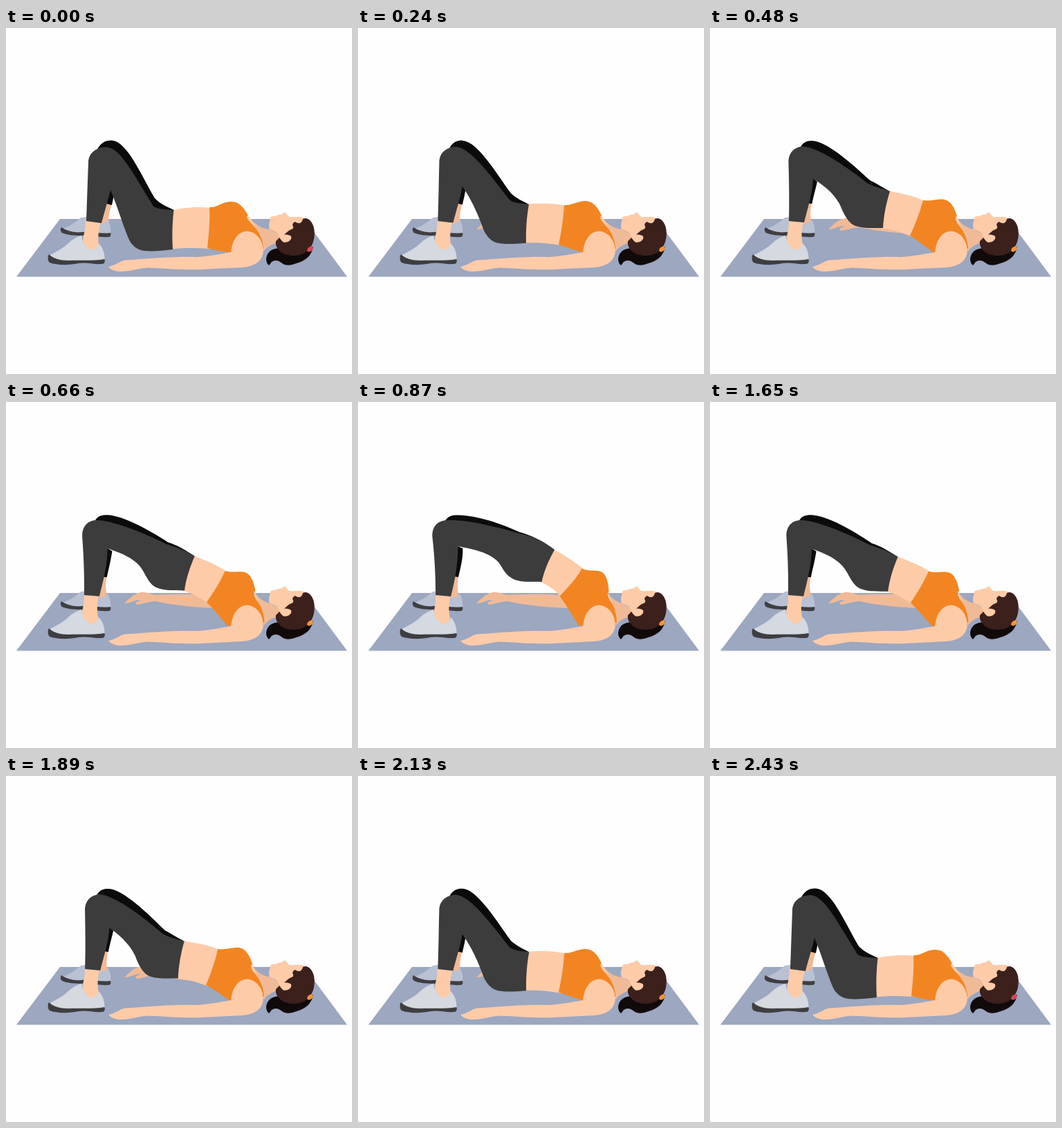
Animation, 500 px wide and 500 px high, one loop 2730 ms. Source, as an HTML page:

```html
<!DOCTYPE html>
<html lang="en">
<head>
<meta charset="utf-8">
<title>Glute bridge</title>
<style>
  html, body { margin: 0; width: 100%; height: 100%; overflow: hidden; background: #fefefe; }
  svg { display: block; width: 100%; height: 100%; }
  .mat { fill: #9ca7c0; }
  .skin { fill: #fecba8; }
  .shade { fill: #f0ba96; }
  .pants { fill: #3c3c3c; }
  .far { fill: #0b0b0b; }
  .top { fill: #f28521; }
  .shoe { fill: #d5d9e0; }
  .far-shoe { fill: #b9c1d3; }
  .sole { fill: #3e3e40; }
  .hair { fill: #3b201c; }
  .tail { fill: #110a0a; }
</style>
</head>
<body>
<svg viewBox="0 0 500 500">
  <path class="mat" d="M78 276H431L493 359.500H15Z"/>
  <path class="shade" d="M171 291C176 286 184 277 195 275C202 274 208 278 217 278.500C245 278 270 277 292 279L304 298C280 297 240 294 216 288C207 288 198 292 189 293L187 290L195 286C188 285 180 291 171 291Z"/>

  <path class="shade" id="farAnkle"/>
  <path class="far-shoe" d="M81 290C91 287 101 281 108 274L116 273L128 281C135 285 143 283 147 277C150 282 152 289 151 297L110 298Z"/>
  <path class="sole" d="M80 288C88 293 97 296 108 295C124 294 138 298 151 296C152 299 151 302 149 302C135 303 123 299 109 300C98 300 88 299 81 296C79 294 78 291 80 288Z"/>
  <path class="far" id="farCalf"/>
  <path class="far" id="farThigh"/>

  <path class="skin" id="ankle"/>
  <path class="shoe" d="M62 329C73 323 83 318 90 311C96 305 103 302 109 300C110 308 115 317 121 320C127 321 133 317 134 311C140 317 143 326 142.500 336L105 339L64 334Z"/>
  <path class="sole" d="M62 327C68 333 78 336 90 336C106 335 125 337 142.500 334C143.500 338 142 341 139 341C126 342 117 338 105 340C90 343 74 343 63 339C60 336 60 330 62 327Z"/>
  <path class="skin" id="waist"/>
  <path class="pants" id="leg"/>

  <path class="tail" d="M444 316C441 330 433 336 420 340C412 343 404 344 399 340C393 335 388 335 384 338C382 340 381 342 380 343C374 338 375 328 382 322C387 318 398 317 406 320Z"/>
  <path class="shade" id="neck"/>
  <path class="skin" d="M381 291C379 286 380 281 382 276C381 273 385 271 390 272L392 270L397 270L403 266C405 268 406 271 410 273C417 274 424 271 431 275L430 290L408 303L398 303C394 297 389 293 381 291Z"/>
  <path class="hair" d="M429 276C436 272 443 280 445 289C448 305 442 319 432 325C422 331 406 330 398 324C392 320 389 314 390 308L395 303L404 297C406 295 408 293 410 292C414 291 416 289 415 287C413 284 415 281 418 280C423 284 428 282 429 276Z"/>
  <path class="skin" d="M393 298C400 298 409 298 412 301C414 306 407 311 401 309.500C398 308 395 303 393 298Z"/>
  <ellipse id="clip" cx="439.500" cy="319.500" rx="5" ry="3.200" transform="rotate(-38 439.500 319.500)"/>

  <path class="top" id="bra"/>
  <path class="skin" id="collar"/>
  <path class="skin" d="M325.500 324C326 308 335 293.500 349 293.500C363 295 373 309 371.500 325C369 340 355 345 340 346L280 349C250 350 225 347 205 346.500C192 347 180 352 163 352C157 351 151 349 148 345C153 344 160 341 165 338C170 335 176 335 182 335C210 333 245 330 275 331C295 330 312 326 325.500 324Z"/>
</svg>
<script>
const LOOP = 2730, STEP = 30, MID = 0.476;

// Each part: lying, half raised and fully raised outline.
const parts = {
  leg: [
    "M116 279C117 250 118 220 119 195C119 181 129 173 145 172C166 173 186 215 211 254C213 262 228 262 242.5 263C240 283 240 303 241 320C225 322 210 323 200 322C190 321 181 314 177 304C168 282 160 255 151 234C148 247 143 263 138 282Z",
    "M114 279C115 250 114 215 113.5 195C113 181 121 172 134 171C154 172 195 198 227 224C238 230 249 232 260 236C254 255 251 272 250 289C235 289 222 290 210 286C202 283 196 274 191 263C185 245 168 229 149 218C148 240 141 260 136 281Z",
    "M112 279C112 250 110 220 107 195C106 181 114 171 128 171C153 169 193 177 232 187C250 190 268 198 286 212C277 228 270 243 267 258C255 257 240 260 226 254C213 248 211 239 204 230C191 216 167 212 144 208C144 235 140 258 134 281Z"
  ],
  farThigh: [
    "M132 175C138 164 146 162 153 162.5C175 164 195 212 215 246C222 254 234 259 243 263L222 285Z",
    "M130 174C134 164 141 163 148 163C169 164 205 196 231 220C240 224 250 231 260 236L225 252Z",
    "M125 172C131 163 138 163.5 146 163.5C172 164 207 174 233 185.5C250 190 268 198 286 212L225 220Z"
  ],
  farCalf: [
    "M149 230L155 238C156 245 154 250 153 256L142 253Z",
    "M146 215L155 222C152 235 149 245 147.5 254L140 253Z",
    "M141 207L151 211C152 226 148 240 145 253L137 252Z"
  ],
  farAnkle: [
    "M142 252L152.500 255C150 265 147 272 149 281L134 284Z",
    "M139 252L147 253C145 264 144 270 147 281L134 284Z",
    "M136 251L145 252C144 264 143 270 146 281L132 284Z"
  ],
  ankle: [
    "M115 277L137 280C135 290 132 300 134 313C132 320 125 323 119 320C113 316 110 309 112 301C114 293 115 285 115 277Z",
    "M114 277L135 279C133 290 131 300 134 313C132 320 125 323 119 320C113 316 109 309 111 301C113 293 114 285 114 277Z",
    "M112 277L133 279C132 290 130 300 133 313C132 320 125 323 119 320C112 316 109 309 110 301C112 293 112 285 112 277Z"
  ],
  waist: [
    "M241 263C260 259 280 258 297 260L296 319C275 318 255 317 237 320Z",
    "M257 235C275 239 294 242 310 250L292 302C275 294 262 291 247 289Z",
    "M284 211C300 220 314 229 327 241L295 282C286 270 278 264 265 258Z"
  ],
  neck: [
    "M347 271C355 274 359 289 382 291L398 300L392 310C385 312 376 317 372 323L360 310Z",
    "M354 271C358 275 363 287 382 291L398 300L392 310C385 312 376 317 373 323L362 310Z",
    "M361 275C365 281 370 288 382 291L398 300L392 310C385 312 376 317 373 323L365 310Z"
  ],
  bra: [
    "M294 259C306 260 311 251 326 251C338 251 345 262 350 271C345 274 352 279 357 285C366 295 371 304 372 319L325 324C315 324 303 321 291 318C293 298 295 279 294 259Z",
    "M308 249C318 251 330 246 339 248C349 250 354 262 357 272C353 275 355 280 360 286C368 295 372 305 373 319L322 324C312 316 300 307 289 300C297 283 303 267 308 249Z",
    "M325 240C336 246 346 241 354 246C361 251 362 264 363 273C361 278 361 282 365 288C371 296 374 306 374 319L319 323C312 312 303 295 292 279C304 267 316 255 325 240Z"
  ],
  collar: [
    "M348 271C353 274 357 281 362 288C355 284 350 279 348 271Z",
    "M355 272C358 275 360 281 364 288C358 284 355 279 355 272Z",
    "M361 276C363 279 365 284 368 290C363 286 361 281 361 276Z"
  ]
};

const byId = id => document.getElementById(id);
const numbers = path => path.match(/[\d.]+/g).map(Number);
const shapes = Object.entries(parts).map(([id, poses]) => ({
  node: byId(id), template: poses[0], poses: poses.map(numbers)
}));

const ease = x => (1 - Math.cos(Math.PI * Math.min(1, Math.max(0, x)))) / 2;
const lift = t => t < 1200 ? ease(t / 990) : 1 - ease((t - 1230) / 1200);

function draw(now) {
  const t = Math.floor(now % LOOP / STEP) * STEP;
  const p = lift(t);
  // Quadratic through the three poses, so the hips travel on an arc.
  const low = (p - MID) * (p - 1) / MID;
  const mid = p * (1 - p) / (MID * (1 - MID));
  const high = p * (p - MID) / (1 - MID);
  for (const { node, template, poses: [a, b, c] } of shapes) {
    let i = 0;
    node.setAttribute("d", template.replace(/[\d.]+/g, () => {
      const v = a[i] * low + b[i] * mid + c[i] * high;
      i++;
      return v.toFixed(2);
    }));
  }
  const resting = p < 0.002 || p > 0.998;
  byId("clip").setAttribute("fill", resting ? "#d2485c" : "#ee9440");
}

function tick() {
  draw(performance.now());
  requestAnimationFrame(tick);
}
tick();
</script>
</body>
</html>
```
